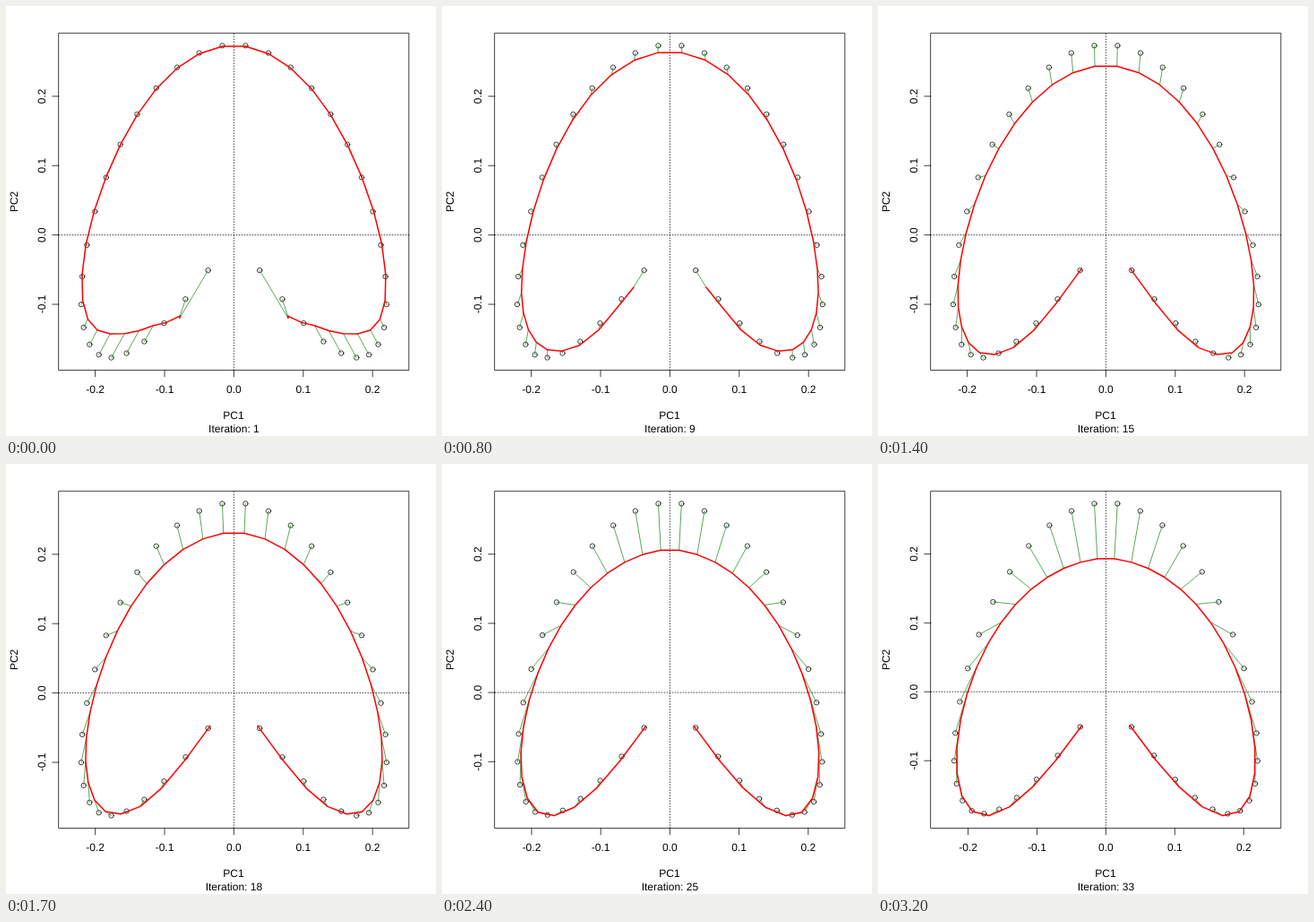
Recreate the animation shown at these times as an HTML page. Size 480x480 px, loop 3300 ms.

```html
<!DOCTYPE html>
<html lang="en">
<head>
<meta charset="utf-8">
<title>Principal curve iterations</title>
<style>
  html, body { margin: 0; width: 100%; height: 100%; overflow: hidden; background: #fff; }
  svg { display: block; width: 100vw; height: 100vh; }
  text { font: 12px "Liberation Sans", Arial, sans-serif; text-anchor: middle; text-rendering: geometricPrecision; }
  path, circle { fill: none; stroke: #000; stroke-width: .75; stroke-linecap: round; stroke-linejoin: round; }
  .zero { stroke-dasharray: .75 2.25; }
  .whisker { stroke: #228b22; }
  .curve { stroke: #f00; stroke-width: 1.5; }
</style>
</head>
<body>
<svg id="plot" viewBox="0 0 480 480"></svg>
<script>
const STEP = 100, COUNT = 33, HALF = 20;
const BOX = { l: 59.04, r: 449.76, t: 30.24, b: 406.56 };
const CX = 254.4, TOP = 44.18, LOW = 392.6, ZERO = 255.6, UNIT = 77.4;
const { sin, cos, exp, max } = Math;

const bump = (i, centre, width) => exp(-(((i - centre) / width) ** 2));

// Right half, from the top round to the tail: offset from the centre line and height
const data = Array.from({ length: HALF }, (_, i) => {
  const s = i + .5;
  return [170.5 * sin(.1524 * s), ZERO - 37.7 - 174.7 * cos(.2182 * s)];
});

// The four ways the fit strays from the data at place i, each an [x, y] offset
const shapes = {
  // the arch flattens, fading out towards the tail
  shrink(i) {
    const s = i + .5, fade = 1 / (1 + exp((s - 15.5) / 1.3));
    return [-27.4 * sin(.2732 * s) * fade,
            (8.6 + 57.2 * cos(.315 * s) + 3 * sin(.33 * s)) * fade];
  },
  // the bottom corners are cut off
  cut(i) {
    const corner = bump(i, 14.2, 3), end = bump(i, 18, 1.1);
    return [9 * end - 15 * corner + 1.5 * bump(i, 8, 2), 24 * end - 27 * corner];
  },
  // a ripple passes from the corners up the sides
  ripple(i) {
    const fade = 1 / (1 + exp((i - 15) / 1.3));
    return [4 * sin(.4245 * (i + .5)) * fade,
            5 * bump(i, 5, 3.5) - 12 * bump(i, 11.8, 2.8) + 7 * bump(i, 16.6, 1.5)];
  },
  // the last point is held back
  tail: i => i === HALF - 1 ? [29, 45] : [0, 0]
};

// How strong each one is at iteration n
function strengths(n) {
  const u = (n - 1) / 8;
  return {
    shrink: (1 + exp(-.175 * (n - 13))) ** -2,
    cut: exp(-.3 * (n - 1)),
    ripple: (u * exp(1 - u)) ** 1.5,
    tail: max(-.1, 1 - (n - 1) / 13)
  };
}

function fitAt(n) {
  const weights = strengths(n);
  return data.map(([x, y], i) => {
    for (const name in shapes) {
      const [dx, dy] = shapes[name](i);
      x += weights[name] * dx;
      y += weights[name] * dy;
    }
    return [x, y];
  });
}

const plot = document.getElementById("plot");
function add(tag, attrs, text) {
  const el = document.createElementNS("http://www.w3.org/2000/svg", tag);
  for (const name in attrs) el.setAttribute(name, attrs[name]);
  if (text) el.textContent = text;
  return plot.appendChild(el);
}

const dots = [];
for (const side of [-1, 1])
  for (let i = 0; i < HALF; i++) dots.push({ side, i, el: add("circle", { r: 2.7 }) });
const axis = add("path", {});
const zero = add("path", { class: "zero" });
const whiskers = add("path", { class: "whisker" });
const curve = add("path", { class: "curve" });

const ticks = [-2, -1, 0, 1, 2];
const xLabels = ticks.map(v => add("text", { y: 432 }, (v / 10).toFixed(1)));
const yLabels = ticks.slice(1).map(v => add("text", {}, (v / 10).toFixed(1)));
add("text", { x: CX - .4, y: 461 }, "PC1");
add("text", { transform: "translate(13.2 218.4) rotate(-90)" }, "PC2");
const caption = add("text", { x: CX, y: 476.2 });

function draw(n) {
  const fit = fitAt(n);
  // the scale shrinks once the curve dips below the lowest point
  const k = (LOW - TOP) / (max(LOW, ...fit.map(p => p[1])) - TOP);
  const px = d => CX + d * k;
  const py = y => TOP + (y - TOP) * k;
  const place = ([x, y], side) => [px(side * x), py(y)];
  const { l, r, t, b } = BOX;

  let frame = `M${l} ${t}H${r}V${b}H${l}Z`;
  ticks.forEach((v, i) => {
    const x = px(v * UNIT), y = py(ZERO - v * UNIT);
    frame += `M${x} ${b}v7.2`;
    xLabels[i].setAttribute("x", x);
    if (i > 0) {
      frame += `M${l} ${y}h-7.2`;
      yLabels[i - 1].setAttribute("transform", `translate(44 ${y}) rotate(-90)`);
    }
  });
  axis.setAttribute("d", frame);
  zero.setAttribute("d", `M${l} ${py(ZERO)}H${r}M${CX} ${b}V${t}`);

  let links = "";
  for (const { side, i, el } of dots) {
    const [x, y] = place(data[i], side);
    el.setAttribute("cx", x);
    el.setAttribute("cy", y);
    links += `M${x} ${y}L${place(fit[i], side)}`;
  }
  whiskers.setAttribute("d", links);

  const left = fit.map(p => place(p, -1)).reverse();
  const right = fit.map(p => place(p, 1));
  curve.setAttribute("d", "M" + left.concat(right).join("L"));
  caption.textContent = "Iteration: " + n;
}

const start = performance.now();
let shown = 0;
function tick() {
  const n = Math.floor((performance.now() - start) / STEP) % COUNT + 1;
  if (n !== shown) draw(shown = n);
  requestAnimationFrame(tick);
}
tick();
</script>
</body>
</html>
```
